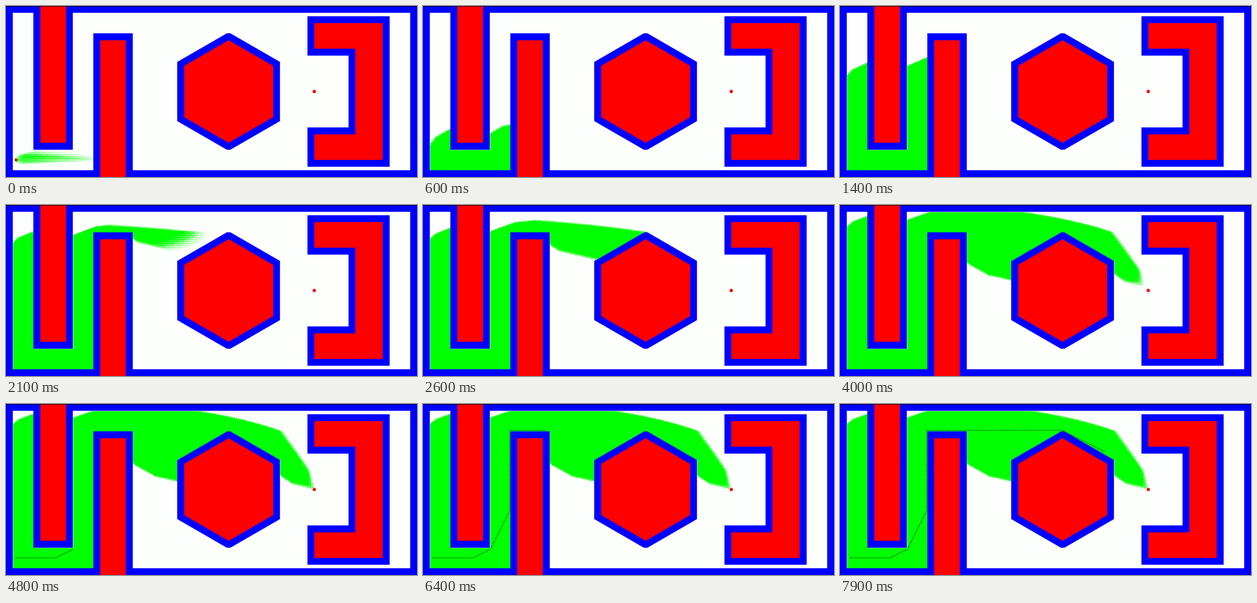
These frames come from a looping animation (800x333 px, 8000 ms). An HTML page with a canvas:

```html
<!DOCTYPE html>
<html lang="en">
<head>
<meta charset="utf-8">
<title>A* search</title>
<style>
  html, body { margin: 0; width: 100%; height: 100%; overflow: hidden; background: #fdfffc; }
  canvas { display: block; width: 800px; height: 333px; }
</style>
</head>
<body>
<canvas id="map" width="1200" height="500"></canvas>
<script>
const W = 1200, H = 500, STEP = 5, LOOP = 8000, FRAME = 100;
const SEARCH_FRAMES = 42.5, PATH_START = 42, PATH_RATE = 6;
const start = [30, 450], goal = [900, 250];
const ctx = document.getElementById('map').getContext('2d');

// Obstacles grown by the clearance of 20
function isFree(x, y) {
  if (x <= 20 || x >= W - 20 || y <= 20 || y >= H - 20) return false;
  if (x >= 80 && x <= 195 && y <= 420) return false;
  if (x >= 255 && x <= 370 && y >= 80) return false;
  const dx = Math.abs(x - 650), dy = Math.abs(y - 250);
  if (dx <= 150 && dy <= 170 && dx * 0.5 + dy * 0.866 <= 150) return false;
  const inBox = x >= 880 && x <= 1120 && y >= 30 && y <= 470;
  return !inBox || (x < 1000 && y > 145 && y < 355);
}

// Twelve headings, 30 degrees apart, truncated to whole cells
const moves = Array.from({ length: 12 }, (_, i) => {
  const a = i * Math.PI / 6;
  const cell = v => Math.trunc(STEP * v + Math.sign(v) * 1e-6);
  return [cell(Math.cos(a)), cell(Math.sin(a))];
});

// A* with a bucket queue; returns cells in the order they are visited
function search() {
  const cost = new Uint16Array(W * H).fill(65535);
  const closed = new Uint8Array(W * H);
  const buckets = [], order = [];
  const toGoal = (x, y) => Math.hypot(goal[0] - x, goal[1] - y);
  const push = (x, y, g) => {
    const id = y * W + x;
    if (g >= cost[id]) return;
    cost[id] = g;
    const b = Math.floor((g + toGoal(x, y)) * 4);
    (buckets[b] ||= []).push(id);
  };
  push(start[0], start[1], 0);
  for (let b = 0; b < buckets.length; b++) {
    while (buckets[b] && buckets[b].length) {
      const id = buckets[b].pop();
      if (closed[id]) continue;
      closed[id] = 1;
      order.push(id);
      const x = id % W, y = (id - x) / W;
      if (toGoal(x, y) <= 1.5) return order;
      for (const [dx, dy] of moves)
        if (isFree(x + dx, y + dy)) push(x + dx, y + dy, cost[id] + STEP);
    }
  }
  return order;
}

// Route as runs of equal moves: count, dx, dy
function buildRoute() {
  let [x, y] = start;
  const points = [];
  for (const [n, dx, dy] of [[23, 5, 0], [13, 4, -2], [28, 2, -4], [47, 0, -5], [79, 5, 0], [40, 4, 2]])
    for (let i = 0; i < n; i++) {
      points.push([x, y]);
      x += dx;
      y += dy;
    }
  return points;
}

function rect(color, x, y, w, h) {
  ctx.fillStyle = color;
  ctx.fillRect(x, y, w, h);
}

function poly(color, points) {
  ctx.fillStyle = color;
  ctx.beginPath();
  points.forEach(p => ctx.lineTo(...p));
  ctx.fill();
}

function hexagon(radius) {
  return Array.from({ length: 6 }, (_, i) => {
    const a = (i + 0.5) * Math.PI / 3;
    return [650 + radius * Math.cos(a), 250 + radius * Math.sin(a)];
  });
}

function bracket(x0, y0, x1, y1, inX, inY0, inY1) {
  return [[x0, y0], [x1, y0], [x1, y1], [x0, y1], [x0, inY1], [inX, inY1], [inX, inY0], [x0, inY0]];
}

function drawMap() {
  const blue = '#0000fe', red = '#fe0000';
  rect(blue, 0, 0, W, H);
  rect('#fdfffc', 20, 20, W - 40, H - 40);
  rect(blue, 80, 0, 115, 420);
  rect(red, 100, 0, 75, 400);
  rect(blue, 255, 80, 115, 420);
  rect(red, 275, 100, 75, 400);
  ctx.save();
  ctx.beginPath();
  ctx.rect(480, 80, 340, 340);
  ctx.clip();
  poly(blue, hexagon(173.2));
  ctx.restore();
  poly(red, hexagon(150));
  poly(blue, bracket(880, 30, 1120, 470, 1000, 145, 355));
  poly(red, bracket(900, 50, 1100, 450, 1020, 125, 375));
  for (const [x, y] of [start, goal]) {
    ctx.fillStyle = red;
    ctx.beginPath();
    ctx.arc(x, y, 5, 0, 7);
    ctx.fill();
  }
  rect('#000', 0, 0, W, 1.5);
}

const order = search(), route = buildRoute();
let lastFrame = Infinity, visited = 0, walked = 0;

function draw() {
  const frame = Math.floor(performance.now() % LOOP / FRAME);
  if (frame < lastFrame) {
    drawMap();
    visited = walked = 0;
  }
  if (frame !== lastFrame) {
    const cells = Math.min(order.length, Math.round(order.length * (frame + 1) / SEARCH_FRAMES));
    ctx.fillStyle = '#00ff00';
    for (; visited < cells; visited++) {
      const id = order[visited];
      ctx.fillRect(id % W, Math.floor(id / W), 1, 1);
    }
    const steps = Math.min(route.length, PATH_RATE * (frame - PATH_START));
    ctx.fillStyle = '#000';
    for (; walked < steps; walked++) ctx.fillRect(route[walked][0] - 1, route[walked][1] - 1, 2, 2);
    lastFrame = frame;
  }
  requestAnimationFrame(draw);
}
draw();
</script>
</body>
</html>
```
